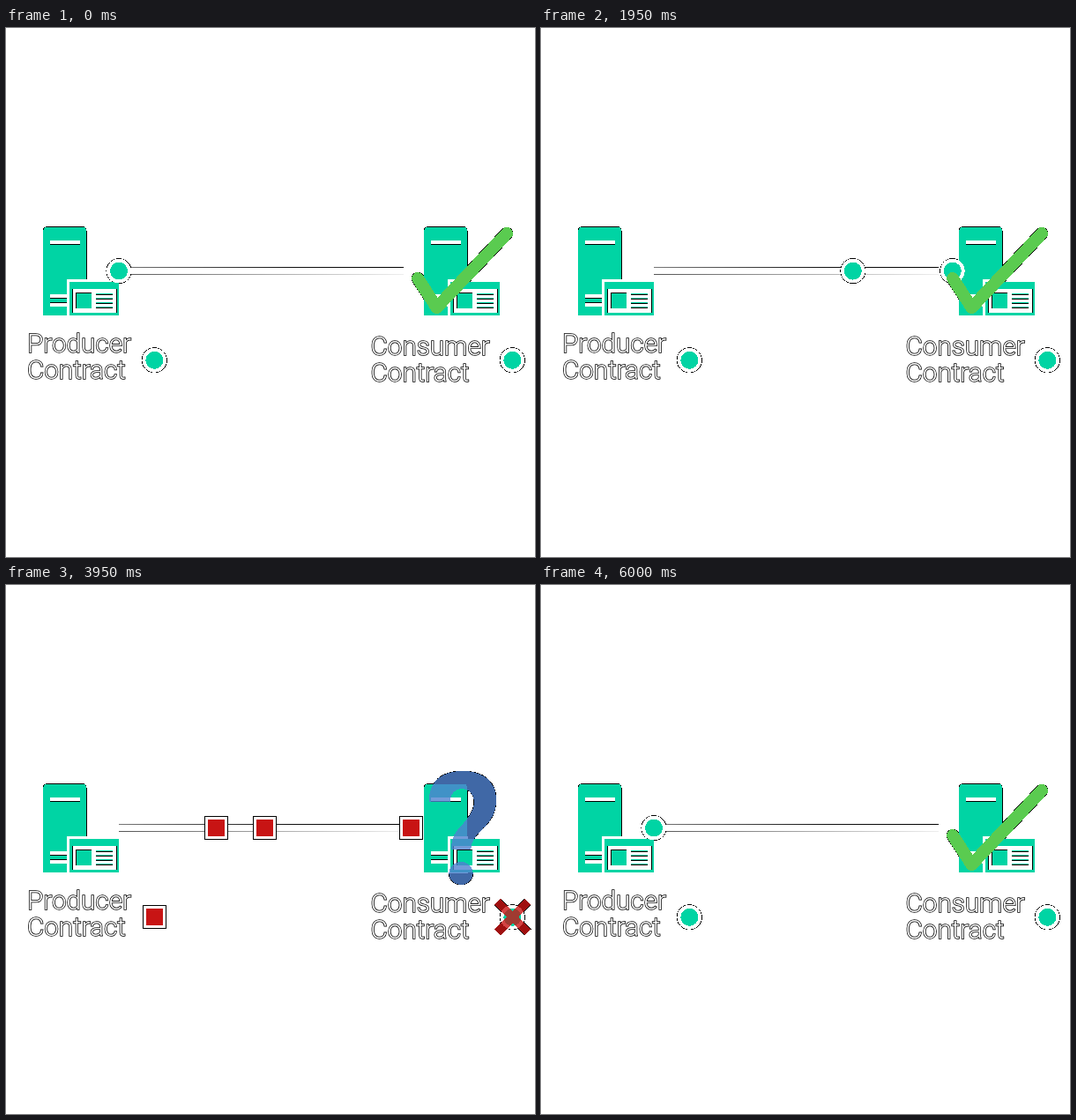
An HTML page for the animation above (6040 ms loop, 600x600 px).

```html
<!DOCTYPE html>
<html lang="en">
<head>
<meta charset="utf-8">
<title>Producer and consumer contracts</title>
<style>
  html, body { margin: 0; width: 100%; height: 100%; overflow: hidden; background: #fff; }
  svg { display: block; width: 100%; height: 100%; shape-rendering: crispEdges; }
  text {
    font: 300 29.7px Roboto, "Liberation Sans", sans-serif;
    fill: #fff; stroke: #000; stroke-width: 1.5; paint-order: stroke;
  }
  .edge { stroke: #000; stroke-width: 1; paint-order: stroke; }
</style>
</head>
<body>
<svg viewBox="0 0 600 600">
  <defs>
    <linearGradient id="upper">
      <stop stop-color="#777"/><stop offset=".6" stop-color="#111"/><stop offset="1"/>
    </linearGradient>
    <linearGradient id="lower">
      <stop stop-color="#555"/><stop offset="1" stop-color="#eee"/>
    </linearGradient>
    <g id="server">
      <path class="edge" fill="#00d4a4" d="M42.4 325.6V230Q42.4 225.6 47 225.6H86.5Q91 225.6 91 230V325.6Z"/>
      <g class="edge" fill="#fff">
        <rect x="50" y="241" width="33.5" height="4"/>
        <rect x="50" y="302" width="21" height="4"/>
        <rect x="50" y="311.5" width="21" height="4"/>
      </g>
      <path fill="#fff" d="M69 327V284.5H92V327Z"/>
      <rect class="edge" x="72.4" y="288" width="55.2" height="37.6" fill="#00d4a4"/>
      <rect class="edge" x="75.5" y="296" width="49.5" height="26.5" fill="#fff"/>
      <rect class="edge" x="79.5" y="300.5" width="17" height="17" fill="#00d4a4"/>
      <path d="M102 301.5h19m-19 5h19m-19 5h19m-19 5h19" stroke="#000" stroke-width="2"/>
      <path d="M102 301.5h19m-19 5h19m-19 5h19m-19 5h19" stroke="#00d4a4"/>
    </g>
    <g id="circle"><circle r="13.9" fill="#fff"/><circle r="10" fill="#00d4a4"/></g>
    <g id="square">
      <rect x="-12.6" y="-12.6" width="25.2" height="25.2" fill="#fff"/>
      <rect x="-9.4" y="-9.4" width="18.8" height="18.8" fill="#c81414"/>
    </g>
    <circle id="circleEdge" r="14.5"/>
    <rect id="squareEdge" x="-13.4" y="-13.4" width="26.8" height="26.8"/>
    <path id="check" d="M467 284L488.5 317L568 233" fill="none"
      stroke-linecap="round" stroke-linejoin="round"/>
    <path id="cross" d="M557.5 359.2L592 394M592 359.2L557.5 394" fill="none"/>
    <path id="question" d="M479.5 246C479.5 223 494 211 518 211C541 211 556 223 556 243
      C556 259 549 269 541 276C533 284 528 290 527 300H505C505 284 511 279 519 270
      C526 262 531 255 531 246C531 237 525 231 517 231C509 231 504 237 504 246Z
      M502.4 327a13.6 13 0 1 0 27.2 0a13.6 13 0 1 0 -27.2 0Z"/>
  </defs>

  <rect x="128" y="271" width="323" height="1" fill="url(#upper)"/>
  <rect x="128" y="279" width="323" height="1" fill="url(#lower)"/>

  <!-- Black undersides give thin edges and darken the translucent marks. -->
  <g id="edges"></g>
  <use class="valid" href="#check" stroke="#000" stroke-width="14.8"/>
  <use class="broken" href="#question" stroke="#000" stroke-width="1"/>
  <use class="broken" href="#cross" stroke="#000" stroke-width="10.5"/>

  <use href="#server"/>
  <use href="#server" x="432"/>
  <text x="23.9" y="368.4">Producer</text>
  <text x="23.9" y="398.4">Contract</text>
  <text x="413.5" y="370.5">Consumer</text>
  <text x="413.5" y="400.5">Contract</text>

  <g transform="translate(168.3 376.8)">
    <g class="valid"><use href="#circleEdge"/><use href="#circle"/></g>
    <g class="broken"><use href="#squareEdge"/><use href="#square"/></g>
  </g>
  <g transform="translate(574.3 376.8)"><use href="#circleEdge"/><use href="#circle"/></g>

  <g id="messages"></g>
  <use class="valid" href="#check" stroke="#5acb50" stroke-width="14"/>
  <use class="broken" href="#question" fill="#5082d0" opacity=".8"/>
  <use class="broken" href="#cross" stroke="#c81414" stroke-width="9.5" opacity=".8"/>
</svg>
<script>
const LOOP = 6040, FPS = 24, PHASE = 3, FADE = 0.2;
const START_X = 128, TRAVEL = 346, LINE_Y = 275.6;

const addUse = id => {
  const use = document.createElementNS("http://www.w3.org/2000/svg", "use");
  document.getElementById(id).appendChild(use);
  return use;
};
const messages = [3, 2, 1].map(duration => ({
  duration, edge: addUse("edges"), body: addUse("messages")
}));
const validParts = document.querySelectorAll(".valid");
const brokenParts = document.querySelectorAll(".broken");
const show = (parts, on) => parts.forEach(part => part.style.display = on ? "" : "none");

// Steps of 1/24 s, with their start times cut to 10 ms.
function steppedSeconds(ms) {
  const tick = Math.floor(ms / 10) * 10 + 10;
  return (Math.ceil(tick * FPS / 1000) - 1) / FPS;
}

function render(ms) {
  const seconds = steppedSeconds(ms % LOOP) % (2 * PHASE);
  const broken = seconds >= PHASE;
  const elapsed = seconds % PHASE;
  const shape = broken ? "#square" : "#circle";
  show(validParts, !broken);
  show(brokenParts, broken);

  for (const { duration, edge, body } of messages) {
    const x = START_X + TRAVEL * Math.min(elapsed / duration, 1);
    const opacity = Math.min(1, Math.max(0, 1 - (elapsed - duration) / FADE));
    for (const use of [edge, body]) use.setAttribute("transform", `translate(${x} ${LINE_Y})`);
    edge.setAttribute("href", shape + "Edge");
    body.setAttribute("href", shape);
    edge.setAttribute("opacity", opacity > 0.5 ? 1 : 0);
    body.setAttribute("opacity", opacity);
  }
}

const start = performance.now();
function loop() {
  render(performance.now() - start);
  requestAnimationFrame(loop);
}
loop();
</script>
</body>
</html>
```
